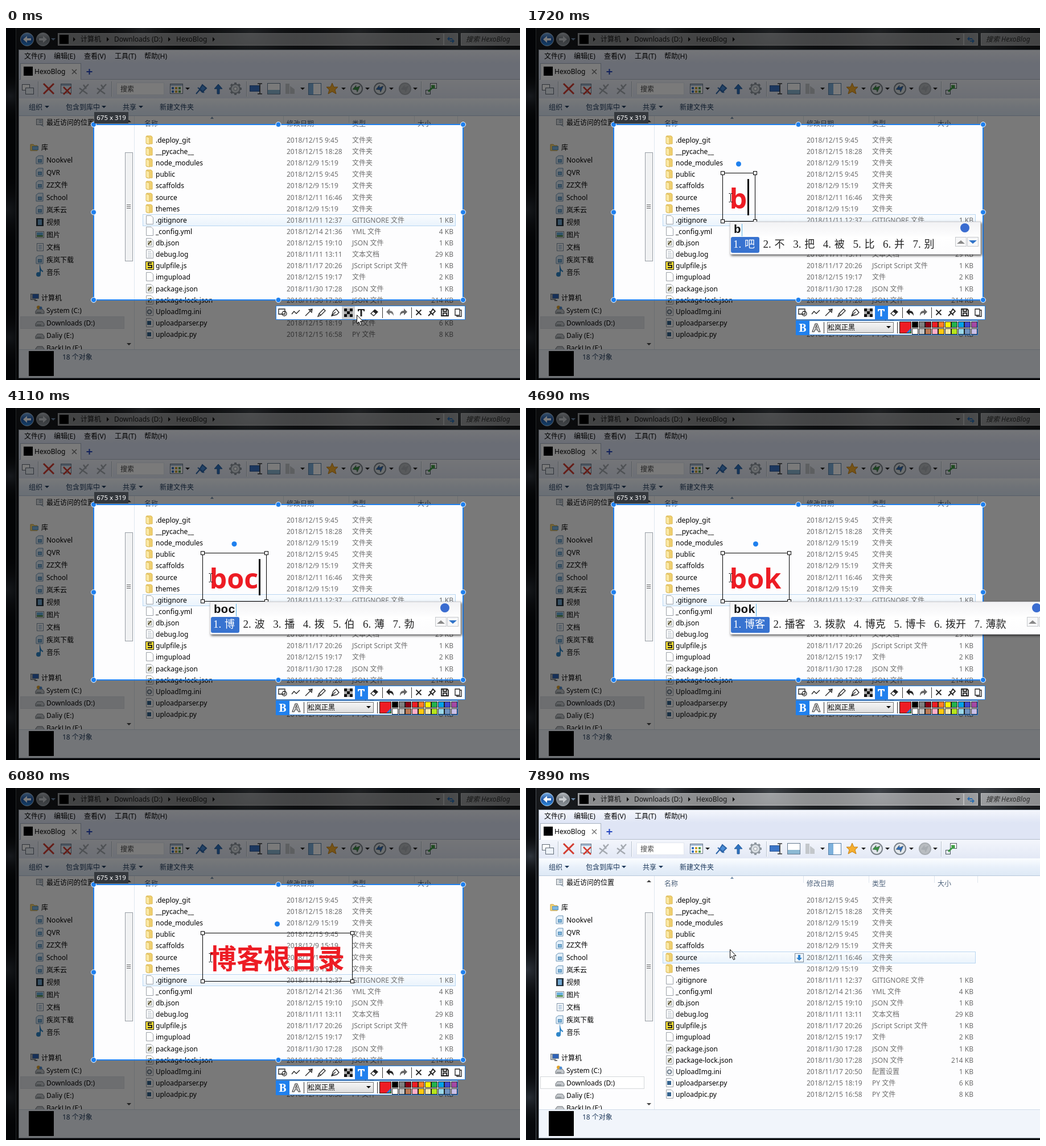
An HTML page with a canvas that plays this animation: 903x620 px, repeating every 8 s.

```html
<!DOCTYPE html>
<html lang="zh-CN">
<head>
<meta charset="utf-8">
<style>
html, body { margin: 0; width: 903px; height: 620px; overflow: hidden; background: #07090c }
canvas { display: block }
</style>
</head>
<body>
<canvas id="stage" width="903" height="620"></canvas>
<script>
const g = document.getElementById('stage').getContext('2d');
const UI = '"Noto Sans","Noto Sans CJK SC",sans-serif', BLUE = '#1f80ee', RED = '#ed1c24';
const LOOP = 8000;

// ---------- drawing helpers ----------
function rect(x, y, w, h, fill, line) {
  if (fill) { g.fillStyle = fill; g.fillRect(x, y, w, h); }
  if (line) { g.strokeStyle = line; g.lineWidth = 1; g.strokeRect(x + .5, y + .5, w - 1, h - 1); }
}
function text(s, x, y, color = '#000', font = '12px ' + UI, align = 'left') {
  g.font = font; g.fillStyle = color; g.textAlign = align;
  g.fillText(s, x, y);
}
const label = (s, x, mid, color, align) => text(s, x, mid + 5, color, undefined, align);
function path(x, y, d, fill, line, width = 1) {
  const p = new Path2D(d);
  g.save(); g.translate(x, y);
  if (fill) { g.fillStyle = fill; g.fill(p); }
  if (line) { g.strokeStyle = line; g.lineWidth = width; g.stroke(p); }
  g.restore();
}
function disc(x, y, r, fill, line, width = 1) {
  g.beginPath(); g.arc(x, y, r, 0, 7);
  if (fill) { g.fillStyle = fill; g.fill(); }
  if (line) { g.strokeStyle = line; g.lineWidth = width; g.stroke(); }
}
function fade(y, h, ...colors) {
  const f = g.createLinearGradient(0, y, 0, y + h);
  colors.forEach((c, i) => f.addColorStop(i / (colors.length - 1), c));
  return f;
}
function glow(x, y, r, color) {
  const f = g.createRadialGradient(x, y, 0, x, y, r);
  f.addColorStop(0, color); f.addColorStop(1, 'transparent');
  rect(x - r, y - r, 2 * r, 2 * r, f);
}
const down = (x, y, c = '#222') => path(x, y, 'M-4-2H4L0 2Z', c);
const right = (x, y) => path(x, y, 'M-2-4V4L2 0Z', '#111');
const at = (list, t) => list.filter(e => e[0] <= t).pop();

// ---------- file window ----------
const FILES = `.deploy_git|15 9:45|文件夹||d
__pycache__|15 18:28|文件夹||d
node_modules|9 15:19|文件夹||d
public|15 9:45|文件夹||d
scaffolds|9 15:19|文件夹||d
source|11 16:46|文件夹||d
themes|9 15:19|文件夹||d
.gitignore|2018/11/11 12:37|GITIGNORE 文件|1|f
_config.yml|14 21:36|YML 文件|4|f
db.json|15 19:10|JSON 文件|1|j
debug.log|2018/11/11 13:11|文本文档|29|t
gulpfile.js|2018/11/17 20:26|JScript Script 文件|1|s
imgupload|15 19:17|文件|2|f
package.json|2018/11/30 17:28|JSON 文件|1|j
package-lock.json|2018/11/30 17:28|JSON 文件|214|j
UploadImg.ini|2018/11/17 20:50|配置设置|1|g
uploadparser.py|15 18:19|PY 文件|6|p
uploadpic.py|15 16:58|PY 文件|8|p`.split('\n').map(l => l.split('|'));
const LIBS = ['Nookvel', 'QVR', 'ZZ文件', 'School', '岚禾云', '视频', '图片', '文档', '疾岚下载', '音乐'];
const DRIVES = ['System (C:)', 'Downloads (D:)', 'Daliy (E:)', 'BackUp (F:)'];

function fileIcon(kind, x, y) {
  if (kind == 'd') {
    path(x, y, 'M-5-7H3L5-5V7H-5Z', '#f0d070', '#d9b550');
    path(x, y, 'M-6-6L0-4V8L-6 6Z', '#fbe9a5', '#dcbb5c');
    return;
  }
  if (kind == 's') { rect(x - 7, y - 7, 15, 15, '#f2dd35', '#222'); path(x, y, 'M4-4H-2V0H4V4H-3', 0, '#222', 2); return; }
  path(x, y, 'M-5.5-7.5H3L6.5-4V7.5H-5.5Z', '#fff', '#9aa0a8');
  if (kind == 'j') { rect(x - 3, y - 3, 7, 8, '#f4f0dc', '#8a8f86'); path(x, y, 'M-2 3L3-3', 0, '#5c5330', 2); }
  if (kind == 't') path(x, y, 'M-3-4H3M-3-1H4M-3 2H4M-3 5H4', 0, '#a9b3bd');
  if (kind == 'g') disc(x, y + 1, 3.5, '#e8edf2', '#6f7e8c', 2);
  if (kind == 'p') rect(x - 4, y - 3, 7, 7, '#35648f');
}

function sideIcon(i, x, y) {
  if (i == 5) { rect(x - 6, y - 7, 13, 14, '#26323d'); rect(x - 3, y - 5, 7, 10, '#6fa6d0'); }
  else if (i == 6) { rect(x - 7, y - 6, 15, 12, '#fff', '#7c8792'); rect(x - 5, y - 4, 11, 8, '#69b0dc'); rect(x - 5, y + 1, 11, 3, '#5c9556'); }
  else if (i == 7) { rect(x - 5, y - 7, 12, 14, '#fff', '#7e93a8'); path(x, y, 'M-2-3H4M-2 0H4M-2 3H4', 0, '#5b8bb8'); }
  else if (i == 9) { disc(x - 2, y + 4, 4, '#2f86c9'); path(x, y, 'M1 4V-7Q2-3 6-1', 0, '#2f86c9', 2); }
  else { path(x, y, 'M-6-4L-2-7H6V7H-6Z', '#e3f0fa', '#6b93b5'); rect(x - 3, y - 1, 7, 6, '#7db5db', '#5387b0'); }
}

function drive(x, y) {
  path(x, y, 'M-7 1L-4-3H5L8 1V5H-7Z', '#c4c8cc', '#6f757b');
  path(x, y, 'M-5 3H3', 0, '#5d646b');
}

function titleBar() {
  rect(0, 0, 903, 620, '#07090c');
  glow(8, 120, 50, '#30363e'); glow(2, 320, 70, '#2c323a'); glow(6, 545, 60, '#272d34');
  rect(17, 0, 886, 620, fade(0, 620, '#17191c', '#0b0d10'));
  for (const [x, y, r] of [[240, 0, 90], [430, 10, 150], [620, 6, 160], [800, 10, 140]]) glow(x, y, r, 'rgba(120,128,136,.4)');
  rect(17, 0, 1, 620, '#4b5157');
  disc(37, 20, 11.5, fade(8, 24, '#7fb4e8', '#1d55a5', '#2f8de0'), '#b4c8dc');
  path(37, 20, 'M-7 0L0-6V-2H7V2H0V6Z', '#fff');
  disc(65, 20, 11.5, fade(8, 24, '#b9bec3', '#70777e', '#8d949a'), '#a7adb3');
  path(65, 20, 'M7 0L0-6V-2H-7V2H0V6Z', '#c8ccd0');
  down(83, 20, '#6d8bab');
  const glass = 'rgba(255,255,255,.5)', edge = 'rgba(255,255,255,.35)';
  rect(91, 9, 678, 22, glass, edge);
  rect(769, 9, 25, 22, glass, edge);
  path(781, 20, 'M-6-1L-2-5V-2H3V0H-2V3ZM7 3L3 7V4H-1V2H3V-1Z', '#2a6db0');
  rect(799, 9, 110, 22, glass, edge);
  rect(94, 12, 16, 16, '#000');
  for (const x of [120, 179, 287, 365]) right(x, 20);
  label('计算机', 131, 19, '#161616'); label('Downloads (D:)', 190, 19, '#161616'); label('HexoBlog', 299, 19, '#161616');
  down(759, 20, '#111');
  text('搜索 HexoBlog', 808, 24, '#2d2d2d', 'italic 12px ' + UI);
}

function toolStrip() {
  const y = 107;
  for (const x of [56, 185, 422, 729]) { rect(x, 94, 1, 27, '#b6c0ce'); rect(x + 1, 94, 1, 27, '#fff'); }
  rect(28, 99, 14, 11, '#fff', '#626c78'); rect(34, 105, 15, 12, '#eef3f9', '#626c78');
  path(75, y, 'M-9-9L9 9M9-9L-9 9', 0, '#d23b30', 3);
  rect(96, 98, 19, 17, '#e9eff7', '#6e7c8c'); rect(97, 99, 17, 3, '#9fb6d0');
  path(107, y + 3, 'M-6-6L7 7M7-6L-6 7', 0, '#d23b30', 2.5);
  for (const x of [137, 168]) path(x, y, 'M-8-1L6 9M8-8L-8 9M-1-7L4 0', 0, '#a4a9b0', 2.5);
  rect(194, 96, 84, 22, '#fff', '#e1e6ee'); label('搜索', 201, y, '#444');
  rect(288, 98, 23, 18, '#fff', '#6b7685'); rect(289, 99, 21, 3, '#a9bed6');
  ['#3b75c4', '#d0a434', '#57a052'].forEach((c, i) => { rect(291 + i * 6, 104, 4, 4, c); rect(291 + i * 6, 110, 4, 4, c); });
  path(343, y, 'M-9 9L-3 2M-6-2L5 7M-3 1L2-7 9-1 2 6Z', '#4b8dd6', '#2c64a8', 2);
  path(373, y, 'M0-8L7 0H2V9H-2V0H-7Z', '#2f73c0', '#245b99');
  for (let i = 0; i < 8; i++) {
    g.save(); g.translate(403, y); g.rotate(i * Math.PI / 4); rect(-2, -11, 4, 5, '#8f979f'); g.restore();
  }
  disc(403, y, 8, '#d9dee3', '#8f979f', 2); disc(403, y, 3, '#fff', '#8f979f');
  rect(428, 101, 18, 11, '#3c76c8', '#2a5594'); path(446, y, 'M-4-9H4M0-9V9M-4 9H4', 0, '#333', 1.5);
  rect(459, 97, 23, 20, '#fff', '#63788e'); rect(460, 109, 21, 7, '#8cb9d4');
  path(498, y, 'M-7-9H0V9H-7ZM1-5L9 1V9H1Z', '#c3c7cb');
  rect(531, 97, 23, 21, '#fff', '#537ea6'); rect(532, 98, 8, 19, '#7db1dc');
  path(573, y, 'M0-10L3-3 10-3 5 2 7 9 0 5-7 9-5 2-10-3-3-3Z', '#f5ae2e', '#c98212');
  for (const [x, c] of [[616, '#389443'], [657, '#2f6db8'], [701, '#a8adb2']]) {
    const off = x == 701;
    disc(x, y, 10, off ? '#b9bdc1' : '#e3e8ec', off ? '#a8adb2' : '#7b838b', 2);
    path(x, y, 'M-7 1L-1-6V-2L6-5 1 6 0 2Z', c, off ? '#a8adb2' : '#4b5157', .6);
  }
  rect(745, 97, 12, 10, '#fff', '#4d5660'); rect(737, 109, 9, 8, '#e5ebf0', '#4d5660');
  path(747, y, 'M-5 5L4-4M0-5H5V0', 0, '#3f9e46', 3);
  for (const x of [319, 521, 593, 635, 677, 719]) down(x, y);
}

function sidebar(shot) {
  rect(23, 155, 202, 411, '#fdfdfe');
  rect(225, 155, 1, 411, '#dfe7f0');
  rect(53, 160, 12, 11, '#dfe3e6', '#7a828a'); path(60, 167, 'M-2-4H3M-2-1H3M0 3L6 6', 0, '#5a7894');
  label('最近访问的位置', 71, 166);
  path(49, 211, 'M-6-6H-1L1-4H6V5H-6Z', '#f3d574', '#caa345'); rect(46, 208, 11, 7, '#7fb8e2', '#5c94be');
  label('库', 62, 210);
  LIBS.forEach((s, i) => { sideIcon(i, 59, 232 + i * 22); label(s, 71, 232 + i * 22); });
  rect(43, 468, 9, 11, '#bcc4cb', '#6a727a'); rect(46, 468, 12, 9, '#2e62b6', '#7c8994'); rect(50, 479, 5, 2, '#777');
  label('计算机', 62, 475);
  rect(25, 508, 183, 22, shot ? '#e4e7ec' : '#fff', shot ? '#dadde2' : '#d4d7da');
  g.save(); g.beginPath(); g.rect(23, 155, 200, 411); g.clip();
  DRIVES.forEach((s, i) => { drive(59, 498 + i * 22); label(s, 71, 497 + i * 22); });
  disc(57, 492, 3, '#e3a52e'); disc(61, 493, 2.5, '#4f8cd0');
  g.restore();
  path(216, 164, 'M-4 2H4L0-2Z', '#444'); down(216, 557, '#444');
  rect(209, 219, 14, 192, '#f1f2f3', '#979da4');
  path(212, 311, 'M0 .5H7M0 3.5H7M0 6.5H7', 0, '#666');
}

function fileList(hover, drop) {
  rect(226, 155, 677, 411, '#fdfdfe');
  for (const x of [487, 602, 717, 793]) rect(x, 155, 1, 12, '#dfe6ee');
  path(362, 158, 'M-3 2H3L0-2Z', '#7a93ad');
  [['名称', 243], ['修改日期', 493], ['类型', 608], ['大小', 723]].forEach(([s, x]) => label(s, x, 168, '#4c607a'));
  FILES.forEach(([name, date, type, size, kind], i) => {
    const y = Math.round(197 + i * 20.12);
    if (i == hover) rect(240, y - 10, 550, 21, fade(y - 10, 21, '#fafcfe', '#e9f3fc'), '#b8d6f2');
    fileIcon(kind, 252, y);
    label(name, 263, y);
    label(date.length > 9 ? date : '2018/12/' + date, 493, y, '#6d6d6d');
    label(type, 608, y, '#6d6d6d');
    if (size) label(size + ' KB', 786, y, '#6d6d6d', 'right');
    if (i == hover && drop) {
      rect(472, y - 7, 16, 16, '#eef5fb', '#7d8a98');
      path(480, y + 1, 'M-2-5H2V0H5L0 5-5 0H-2Z', '#2e83cf');
    }
  });
}

function fileWindow(hover, shot) {
  titleBar();
  rect(22, 38, 881, 579, '#fff', '#8f9aa5');
  rect(23, 39, 880, 22, fade(39, 22, '#f4f6fc', '#dfe5f5'));
  [['文件(F)', 32], ['编辑(E)', 84], ['查看(V)', 137], ['工具(T)', 191], ['帮助(H)', 243]].forEach(([s, x]) => label(s, x, 49));
  rect(23, 61, 880, 30, '#dfe5f5');
  rect(23, 90, 880, 35, fade(90, 35, '#f4f6fc', '#e2e8f5'));
  rect(23, 90, 880, 1, '#b3bdcb');
  rect(25, 62, 107, 29, '#fff', '#a8b2c0'); rect(26, 90, 105, 1, '#fff');
  rect(31, 68, 16, 16, '#000');
  label('HexoBlog', 50, 76);
  path(120, 77, 'M-4-4L4 4M4-4L-4 4', 0, '#777', 1.5);
  path(146.5, 77, 'M-5 0H5M0-5V5', 0, '#2446bf', 2);
  toolStrip();
  rect(23, 124, 880, 31, fade(124, 31, '#fbfdff', '#e8f0fa', '#dde8f5'));
  rect(23, 154, 880, 1, '#b8c8dc');
  [['组织', 40, 72], ['包含到库中', 105, 172], ['共享', 205, 237], ['新建文件夹', 270]].forEach(([s, x, a]) => {
    label(s, x, 139, '#1e395b');
    if (a) down(a, 139, '#1e395b');
  });
  sidebar(shot);
  fileList(hover, !shot);
  rect(23, 566, 880, 50, '#f1f5fb'); rect(23, 566, 880, 1, '#cfdbe9');
  rect(40, 569, 44, 44, '#000');
  label('18 个对象', 99, 579, '#1e395b');
}

// ---------- capture overlay ----------
const ICONS = [
  [486, 'M-7-6H4V3H-7ZM7 2A4 4 0 1 1-1 2A4 4 0 1 1 7 2'], [509, 'M-7 3L-3-2 1 2 7-4'], [532, 'M-6 6L5-5M0-5L6-6 5 0Z'],
  [555, 'M-7 7L-5 2 3-6 6-3-2 5ZM-5 2L-2 5'], [578, 'M-6 6L-3-2 2-6 7 0 3 4ZM-6 6L1-1'],
  [647, 'M-6 2L1-5 6-1-1 6ZM-2-2L1-5 6-1 3 2Z'],
  [725, 'M-4.5-4.5L4.5 4.5M4.5-4.5L-4.5 4.5', 1.8], [748, 'M-6 6L-1 1M-4-2L3 5M-2 0L2-6 6-2 1 3Z', 1.8],
  [771, 'M-6-6H4L6-4V6H-6ZM-3-6V-2H3V-6M-3 6V1H3V6', 1.8], [794, 'M-5-6H3V5H-5ZM-2 5V7H6V-4H3']
];
const TOP_INKS = '#000 #7f7f7f #880015 #ed1c24 #ff7f27 #fff200 #22b14c #00a2e8 #3f48cc #a349a4'.split(' ');
const LOW_INKS = '#fff #c3c3c3 #b97a57 #ffaec9 #ffc90e #efe4b0 #b5e61d #99d9ea #7092be #c8bfe7'.split(' ');
const CURVED = 'M-7-1L-1-7V-3C4-3 6 0 6 6 4 2 2 1-1 1V5Z';

function toolbar(t) {
  const active = t >= 420, ink = '#222';
  rect(474, 489, 333, 25, '#fff', BLUE);
  if (t < 120) rect(590, 490, 23, 23, '#cfcfcf');
  else rect(613, 490, 23, 23, active ? BLUE : '#cfcfcf');
  for (const [x, d, w] of ICONS) path(x, 501, d, 0, ink, w || 1.3);
  for (let i = 0; i < 9; i++) rect(594 + i % 3 * 5, 494 + (i / 3 | 0) * 5, 5, 5, i % 2 ? '#aaa' : '#111');
  path(624, 501, 'M-6-6H6V-2H4V-4H1.5V7H-1.5V-4H-4V-2H-6Z', active ? '#fff' : ink);
  path(647, 501, 'M-2-2L1-5 6-1 3 2Z', ink);
  path(675, 501, CURVED, t >= 700 ? ink : '#777');
  g.save(); g.translate(698, 501); g.scale(-1, 1); path(0, 0, CURVED, '#666'); g.restore();
  rect(661, 492, 1, 19, '#333'); rect(712, 492, 1, 19, '#333');
  if (active) fontBar();
}

function fontBar() {
  rect(474, 515, 320, 26, '#fff', BLUE);
  rect(474, 515, 24, 25, BLUE);
  text('B', 486, 535, '#fff', 'bold 20px "Noto Serif",serif', 'center');
  g.font = 'bold 20px "Noto Sans",sans-serif'; g.strokeStyle = '#222'; g.lineWidth = 1; g.textAlign = 'center';
  g.strokeText('A', 510, 535);
  rect(523, 518, 1, 20, '#333'); rect(652, 518, 1, 20, '#333');
  rect(529, 518, 117, 19, fade(518, 19, '#f7f7f7', '#dcdcdc'), '#777');
  label('松岚正黑', 530, 527);
  down(637, 527, '#000');
  rect(656, 517, 21, 21, RED, '#222');
  path(676, 537, 'M0-8V0H-8Z', '#2d6fe0'); path(676, 537, 'M0-4V0H-4Z', '#35b54a');
  [TOP_INKS, LOW_INKS].forEach((row, r) => row.forEach((c, i) =>
    rect(678 + Math.round(i * 11.5), 517 + r * 12, 11, 11, c, '#222')));
}

function overlay(t) {
  g.beginPath(); g.rect(0, 0, 903, 620); g.rect(154, 170, 649, 309);
  g.fillStyle = 'rgba(0,0,0,.52)'; g.fill('evenodd');
  g.strokeStyle = BLUE; g.lineWidth = 2; g.strokeRect(154, 170, 649, 309);
  for (const x of [154, 478.5, 803]) for (const y of [170, 324.5, 479])
    if (x != 478.5 || y != 324.5) disc(x, y, 4.5, BLUE, '#fff');
  rect(155, 148, 60, 20, '#34383d');
  text('675 x 319', 185, 162, '#fff', '11.5px ' + UI, 'center');
  toolbar(t);
}

// ---------- typing ----------
const B = '吧 不 把 被 比 并 别', BO = '博 波 播 拨 伯 薄 勃', BL = '比 笔 必 毕 币 闭 避';
// start time, committed text, keys, candidates
const TYPING = [
  [700, '', ''], [1720, '', 'b', B], [2000, '', 'bo', BO], [2270, '', 'bop', BO], [2730, '', 'bo', BO], [2850, '', 'b', B],
  [3280, '', 'bl', BL], [3400, '', 'bo', BO], [4110, '', 'boc', BO], [4260, '', 'b', B], [4380, '', 'bl', BL],
  [4690, '', 'bok', '博客 播客 拨款 博克 博卡 拨开 薄款'], [4840, '', 'boke', '博客 播客 伯克 博克 博课 波克 薄刻'],
  [4990, '博客', ''], [5140, '博客', 'g', '个 过 给 该 跟 高 更'], [5260, '博客', 'gf', '跟 根 亘 艮 哏 茛 跟着'],
  [5410, '博客', 'gfm', '跟没 根木 根毛 跟 根 艮 亘'], [5680, '博客', 'gfmu', '根目 根木 跟母 跟 根 艮 亘'],
  [5930, '博客', 'gfmulu', '根目录 根木 跟 根 艮 亘 茛'], [6080, '博客根目录', '']
];

// Draws a run of large red text and returns its end position.
function bigText(s, x, size) {
  text(s, x, 318, RED, `bold ${size}px ${UI}`);
  return x + g.measureText(s).width;
}

function textBox(t) {
  const [, done, keys, words] = at(TYPING, t);
  const end = bigText(keys, bigText(done, 357.5, 47.5), 48.5);
  if (t >= 7070) return;
  const edge = Math.round(end + 13.5), caret = t < 4690 || t >= 6920;
  if (caret) rect(Math.round(end) + 1, 266, 3, 64, '#000');
  rect(345, 255, edge - 344, 86, 0, '#000');
  for (const x of [345, edge]) for (const y of [255, 340]) rect(x - 3, y - 3, 7, 7, '#fff', '#000');
  disc((345 + edge) / 2, 239.5, 4.5, BLUE);
  if (words) inputPanel(done ? 435 : 358, keys, words.split(' '));
}

function inputPanel(x, keys, words) {
  const width = words.reduce((n, w) => n + w.length * 18 + 34.6, 0) + 73;
  const edge = Math.round(x + width);
  g.save();
  g.shadowColor = 'rgba(0,0,0,.65)'; g.shadowBlur = 4; g.shadowOffsetX = g.shadowOffsetY = 2;
  rect(x, 341, edge - x, 58, '#fff');
  g.restore();
  rect(x, 341, edge - x, 58, fade(341, 58, '#f2f2f4', '#fff', '#fcfcfd'), '#d0d0d4');
  text(keys, x + 7, 361, '#111', 'bold 21px "Liberation Mono",monospace');
  rect(Math.round(x + 8 + keys.length * 12.6), 345, 1, 22, '#5ab4e8');
  let left = x + 6;
  words.forEach((word, i) => {
    const ink = i ? '#222' : '#fff';
    if (!i) {
      g.beginPath(); g.roundRect(x + 2, 368, 32 + 18 * word.length, 28, 3);
      g.fillStyle = '#3873d0'; g.fill();
    }
    text(i + 1 + '.', left, 387, ink, '19px "Liberation Serif",serif');
    text(word, left + 20, 387, ink, '18px "Noto Sans CJK SC",sans-serif');
    left += word.length * 18 + 34.6;
  });
  disc(edge - 28, 352, 8, '#3a6cd0');
  for (const [dx, d, c] of [[-35, 'M-7 3L0-3 7 3Z', '#888'], [-14, 'M-7-3L0 3 7-3Z', '#2f73c8']]) {
    rect(edge + dx - 10, 368, 20, 17, '#f7f7f8', '#c5c8cc');
    path(edge + dx, 377, d, c);
  }
}

// ---------- pointer and playback ----------
const POINTER = [
  [0, 616, 505], [120, 621, 502], [270, 627, 503], [420, 500, 381, 1], [580, 359, 299, 1],
  [7350, 357, 298], [7620, 358, 307], [7740, 358, 315], [7890, 358, 284]
];
const HOVER = [[0, 7], [7470, 5], [7740, 6], [7890, 5]];

function pointer(t) {
  const [, x, y, beam] = at(POINTER, t);
  if (beam) path(x + .5, y, 'M-3-7.5H-1L0-6.5 1-7.5H3M0-6.5V6.5M-3 7.5H-1L0 6.5 1 7.5H3', 0, '#000');
  else path(x + .5, y + .5, 'M0 0V15L3.5 12 6 18 8.5 17 6 11H10.5Z', '#fff', '#000');
}

function draw(now) {
  const t = now % LOOP, shot = t < 7470;
  fileWindow(at(HOVER, t)[1], shot);
  if (shot) {
    overlay(t);
    if (t >= 700) textBox(t);
  }
  pointer(t);
}

const start = performance.now();
function tick() {
  draw(performance.now() - start);
  requestAnimationFrame(tick);
}
tick();
</script>
</body>
</html>
```
